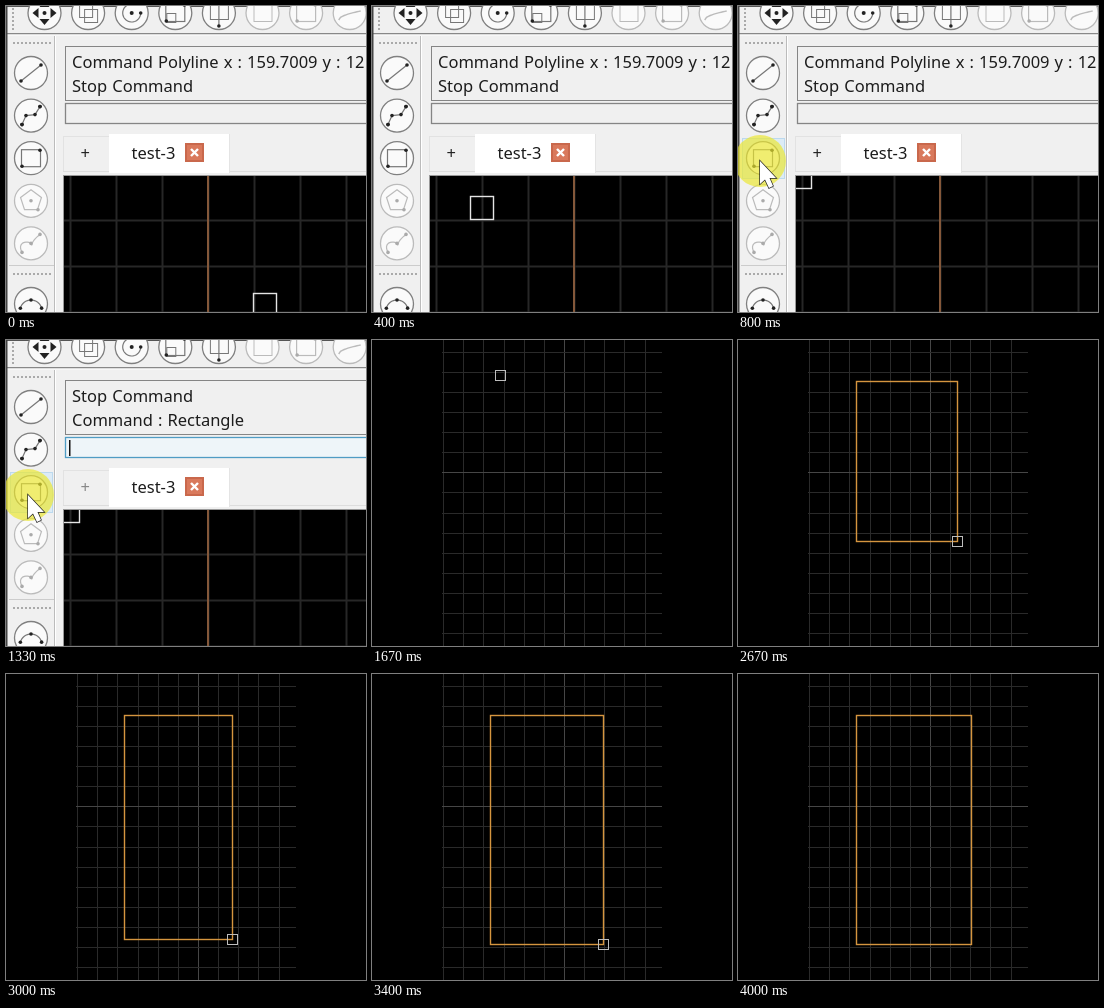
An HTML page with a canvas that plays this animation: 360x306 px, repeating every 5070 ms.

```html
<!DOCTYPE html>
<html>
<head>
<meta charset="utf-8">
<style>
html, body { margin: 0; height: 100%; overflow: hidden; background: #000; }
canvas { display: block; }
</style>
</head>
<body>
<canvas id="stage" width="360" height="306"></canvas>
<script>
const c = document.getElementById('stage').getContext('2d');
const LOOP = 5070, STEP = 1000 / 15;
const CLICK = 1000, FADE = [1333, 1663], DRAG = 2270, DROP = 3730, GONE = 3990;

const progress = (t, from, to) => Math.min(1, Math.max(0, (t - from) / (to - from)));

function ease(t, from, to) {
  const k = progress(t, from, to);
  return k * k * (3 - 2 * k);
}

function fill(x, y, w, h, color) {
  c.fillStyle = color;
  c.fillRect(x, y, w, h);
}

function frame(x, y, w, h, color, width = 1) {
  c.strokeStyle = color;
  c.lineWidth = width;
  c.strokeRect(Math.round(x) + .5, Math.round(y) + .5, w, h);
}

function path(points, color, width = 1, closed = false) {
  c.beginPath();
  for (const [x, y] of points) c.lineTo(x, y);
  if (closed) c.closePath();
  c.strokeStyle = color;
  c.lineWidth = width;
  c.stroke();
}

function disc(x, y, r, color) {
  c.beginPath();
  c.arc(x, y, r, 0, 7);
  c.fillStyle = color;
  c.fill();
}

// Points along a curve given by a function of 0..1
const curve = (n, fn) => Array.from({ length: n + 1 }, (_, i) => fn(i / n));
const ring = (n, r, from, sweep) => curve(n, k =>
  [r * Math.cos(from + k * sweep), r * Math.sin(from + k * sweep)]);

function nodes(points, ink) {
  for (const [x, y] of points) disc(x, y, 1.8, ink);
}

function wire(points, line, ink) {
  path(points, line, 1.2);
  nodes([points[0], points[points.length - 1]], ink);
}

function text(str, x, y, color = '#1c1c1c') {
  c.font = '16.5px "Noto Sans", sans-serif';
  c.wordSpacing = '0.8px';
  c.fillStyle = color;
  c.fillText(str, x, y);
}

const icons = {
  move(line, ink) {
    c.fillStyle = ink;
    for (let i = 0; i < 4; i++) {
      c.rotate(Math.PI / 2);
      c.beginPath();
      c.moveTo(12, 0); c.lineTo(6, -5); c.lineTo(6, 5);
      c.fill();
    }
    disc(0, 0, 2, ink);
  },
  copy(line) { for (const d of [-9, -4]) frame(d, d, 13, 13, line); },
  rotate(line, ink) { wire(ring(24, 9, 0, 4.9), line, ink); disc(0, 0, 2, ink); },
  scale(line, ink) { frame(-9, 0, 9, 9, line); icons.box(line, ink); },
  mirror(line, ink) { frame(-9, -9, 18, 15, line); wire([[0, -13], [0, 13]], line, ink); },
  plate(line) { frame(-9, -9, 18, 17, line); },
  slope(line) { path(curve(12, k => [22 * k - 11, 7 - 9 * Math.sqrt(k)]), line, 1.4); },
  line(line, ink) { wire([[-10, 8], [10, -8]], line, ink); },
  polyline(line, ink) {
    const points = [[-9, 9], [-5, 0], [4, -1], [9, -9]];
    wire(points, line, ink);
    nodes(points, ink);
  },
  box(line, ink) { frame(-10, -9, 19, 17, line, 1.2); nodes([[-9, 8], [9, -8]], ink); },
  pentagon(line, ink) {
    path(ring(5, 11, -Math.PI / 2, 2 * Math.PI), line, 1.2, true);
    nodes([[0, 0], [7, 9]], ink);
  },
  spline(line, ink) {
    wire(curve(24, k => [18 * k - 9 + 7 * Math.sin(k * 2 * Math.PI) * (2 * k - 1), 9 - 18 * k
      - 5 * Math.sin(k * 2 * Math.PI)]), line, ink);
    disc(0, 0, 1.8, ink);
  },
  arc(line, ink) {
    c.translate(0, 7);
    wire(ring(16, 11, 3.4, 2.62), line, ink);
    disc(0, -11, 1.8, ink);
  }
};
const topIcons = ['move', 'copy', 'rotate', 'scale', 'mirror', 'plate', 'box', 'slope'];
const sideIcons = ['line', 'polyline', 'box', 'pentagon', 'spline'];

function button(x, y, name, pale) {
  c.save();
  c.translate(x, y);
  disc(0, 0, 16.5, '#fafafa');
  c.strokeStyle = pale ? '#bbb' : '#808080';
  c.lineWidth = 1.3;
  c.stroke();
  icons[name](pale ? '#bbb' : '#777', pale ? '#aaa' : '#222');
  c.restore();
}

function drawToolbars(hover) {
  fill(0, 0, 360, 1, '#555');
  for (let y = 2; y < 24; y += 4) fill(6, y, 2, 2, '#aaa');
  topIcons.forEach((name, i) => button(38.5 + i * 43.6, 7, name, i > 4));
  fill(0, 27, 360, 1.5, '#888');
  fill(0, 28.5, 360, 1, '#fff');
  fill(0, 0, 1.5, 306, '#444');

  for (const y of [36, 267]) for (let x = 7; x < 44; x += 4) fill(x, y, 2, 2, '#aaa');
  fill(3, 259, 45, 1, '#ccc');
  fill(48, 30, 1, 276, '#bbb');
  fill(49, 30, 1, 276, '#fff');
  if (hover) {
    fill(4, 132, 43, 41, '#dcebf6');
    frame(4, 132, 42, 40, '#bcd9ee');
  }
  sideIcons.forEach((name, i) => button(25, 67 + i * 42.6, name, i > 2));
  button(25, 298, 'arc');
}

function drawPanels(active) {
  frame(59, 40, 320, 54, '#858585');
  const lines = ['Command Polyline x : 159.7009 y : 12', 'Stop Command', 'Command : Rectangle'];
  lines.slice(active, active + 2).forEach((line, i) => text(line, 66, 61.5 + i * 24.5));
  fill(59, 97, 310, 21, active ? '#eef5f9' : '#f0f0f0');
  frame(59, 97, 320, 20, active ? '#4f9cc4' : '#858585', 1.3);
  if (active) fill(63, 100, 1.5, 16, '#111');

  frame(57, 130, 46, 35, '#e2e2e2');
  fill(57, 165, 303, 1, '#ddd');
  frame(103, 128, 120, 38, '#e4e4e4');
  fill(103, 128, 120, 39, '#fff');
  text('+', 74.5, 153, active ? '#888' : '#222');
  text('test-3', 125.5, 153);
  fill(179, 137, 19, 19, '#c9684c');
  fill(181, 139, 15, 15, '#d9795c');
  for (const s of [-3.5, 3.5]) path([[188.5 - s, 143], [188.5 + s, 150]], '#fff', 2.4);
}

function drawCanvas(x, y) {
  c.save();
  fill(57, 169, 303, 137, '#999');
  c.beginPath();
  c.rect(58, 170, 302, 136);
  c.clip();
  fill(58, 170, 302, 136, '#000');
  for (let gx = 63.5; gx < 360; gx += 46) fill(gx, 170, 2, 136, '#272727');
  for (let gy = 213.5; gy < 306; gy += 46) fill(58, gy, 302, 2, '#272727');
  fill(201, 170, 2, 136, '#84583a');
  frame(x - 12, y - 12, 23, 23, '#e4e4e4', 1.4);
  c.restore();
}

function drawPointer(x, y) {
  c.save();
  c.translate(x, y);
  disc(0, 0, 26, 'rgba(236, 232, 48, .68)');
  path([[0, 0], [0, 23], [5, 18.5], [9, 27], [13, 25], [9.5, 17], [16, 17]], '#222', 1.4, true);
  c.fillStyle = '#fff';
  c.fill();
  c.restore();
}

function drawApp(t) {
  const active = t >= CLICK ? 1 : 0;
  const cross = progress(t, 0, 530), reach = ease(t, 400, 800);
  fill(0, 0, 360, 306, '#f0f0f0');
  drawToolbars(t >= 600);
  drawPanels(active);
  drawCanvas(258.5 - 197 * cross, 299 - 128.5 * cross);
  if (t >= 530) drawPointer(56 - 34 * reach, 170 - 15 * reach);
}

function pickPosition(t) {
  const near = progress(t, 1670, 2130), swing = Math.sin(near * Math.PI);
  return [
    128 - 10 * near + 18 * swing + 108 * ease(t, DRAG, 2740) + 7 * ease(t, 3200, 3500)
      + 5 * progress(t, 3800, 3930),
    35 + 6 * near + 12 * swing + 201 * ease(t, DRAG, 2830) + 28 * ease(t, 2800, 3070)
  ];
}

function drawSheet(t) {
  const grid = i => i ? '#2a2a2a' : '#464646';
  fill(0, 0, 360, 306, '#000');
  for (let i = -6; i < 5; i++) fill(Math.round(192 + i * 20.15), 0, 1, 306, grid(i));
  for (let i = -6; i < 9; i++) fill(70, Math.round(132.3 + i * 20.12), 220, 1, grid(i));
  const [x, y] = pickPosition(t);
  if (t > DRAG) {
    const [right, bottom] = pickPosition(Math.min(t, DROP));
    frame(118, 41, Math.round(right) - 118, Math.round(bottom) - 41, '#d5953f', 1.4);
  }
  if (t < GONE) frame(x - 5, y - 5, 10, 10, '#bdbdbd');
}

function draw() {
  const now = (performance.now() - start) % LOOP;
  const t = Math.floor((now + 5) / STEP) * STEP;
  const fade = progress(t, ...FADE);
  if (fade < 1) drawApp(t);
  c.globalAlpha = fade;
  if (fade > 0) drawSheet(t);
  c.globalAlpha = 1;
  requestAnimationFrame(draw);
}

const start = performance.now();
draw();
</script>
</body>
</html>
```
